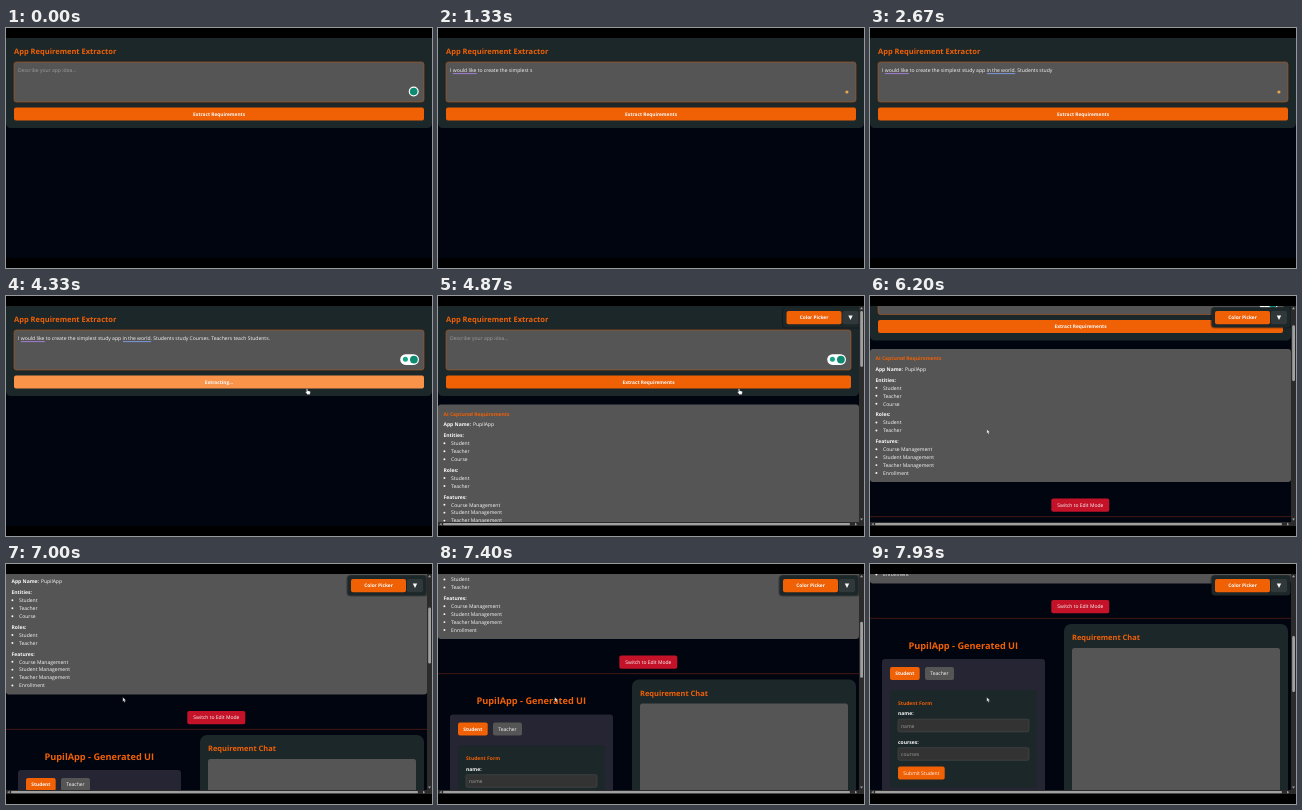
Recreate the animation shown at these times as an HTML page. Size 426 by 240 pixels, loop 8000 ms.

```html
<!DOCTYPE html>
<html lang="en">
<head>
<meta charset="utf-8">
<title>App Requirement Extractor</title>
<style>
  html, body { margin: 0; width: 100%; height: 100%; overflow: hidden; background: #000; }
  svg { display: block; width: 426px; height: 240px; }
  text { font-family: "Open Sans", "Noto Sans", sans-serif; text-rendering: geometricPrecision; white-space: pre; }
</style>
</head>
<body>
<svg id="stage" viewBox="0 0 426 240"></svg>
<script>
const LOOP = 8000, FPS = 15, NOTCH = 55.5;
const ORANGE = '#f06005', CARD = '#1c2729', GREY = '#555', WHITE = '#fafafa', HINT = '#9c9c9c';
const APP = 'PupilApp';
const IDEA = 'I would like to create the simplest study app in the world. ' +
  'Students study Courses. Teachers teach Students.';
const stage = document.getElementById('stage');

const rect = (x, y, w, h, fill, r = 0, extra = '') =>
  `<rect x="${x}" y="${y}" width="${w}" height="${h}" rx="${r}" fill="${fill}" ${extra}/>`;
const circle = (x, y, r, fill) => `<circle cx="${x}" cy="${y}" r="${r}" fill="${fill}"/>`;
const path = (d, fill, extra = '') => `<path d="${d}" fill="${fill}" ${extra}/>`;
const group = (x, y, content) => `<g transform="translate(${x} ${y})">${content}</g>`;

// y is the middle of the lowercase letters' line
const text = (x, y, str, { size = 5.06, fill = WHITE, weight = 400, anchor = 'start' } = {}) =>
  `<text x="${x}" y="${y + size * 0.36}" font-size="${size}" font-weight="${weight}" ` +
  `fill="${fill}" text-anchor="${anchor}">${str}</text>`;
const bold = (x, y, str, opts) => text(x, y, str, { size: 5, weight: 700, ...opts });
const button = (x, y, w, h, fill, label, weight = 400, size = 5) =>
  rect(x, y, w, h, fill, 2) +
  text(x + w / 2, y + h / 2, label, { size, weight, anchor: 'middle' });

const progress = (t, from, to) => Math.min(1, Math.max(0, (t - from) / (to - from)));
const ease = (t, from, to) => {
  const p = progress(t, from, to);
  return p * p * (3 - 2 * p);
};

function assistant(x, t) {
  if (t < 60) return circle(x, 63.5, 5, '#fff') + circle(x, 63.5, 3.8, '#0f8a72');
  if (t < 4000) return circle(x + 1.2, 64, 1.6, '#e5a850');
  return rect(x - 13.5, 58.3, 18.8, 10.6, '#fff', 5.3) +
    circle(x - 8.3, 63.3, 2.5, '#17a488') + circle(x + 0.2, 63.6, 3.9, '#0f8a72');
}

function extractor(t, width, done) {
  const inner = width - 16;
  const typed = done ? '' : IDEA.slice(0, Math.floor(t * 0.02785));
  const busy = t >= 4260 && !done;
  const underline = (x, w, color) => rect(x, 45.2, w, 0.9, color);
  return path(`M0 10H${width}V95q0 5-5 5H5q-5 0-5-5z`, CARD) +
    bold(8, 23.3, 'App Requirement Extractor', { size: 7.5, fill: ORANGE }) +
    rect(8, 34, inner, 40, GREY, 2.5, 'stroke="#b8541a" stroke-width=".6"') +
    (typed ? text(12, 42, typed) : text(12, 42, 'Describe your app idea...', { fill: HINT })) +
    (!done && t > 800 ? underline(14.8, 24, '#a77fe0') : '') +
    (!done && t > 2350 ? underline(117, 28.2, '#7f9fe8') : '') +
    assistant(width - 18.3, t) +
    button(8, 79.5, inner, 13, busy ? '#f9934a' : ORANGE,
      busy ? 'Extracting...' : 'Extract Requirements', 700, 4.8);
}

function list(y, title, items) {
  return bold(5.5, y, title) + items.map((item, i) =>
    circle(6.4, y + 8 + i * 7.95, 0.95, WHITE) + text(13, y + 8 + i * 7.95, item)).join('');
}

function results() {
  return rect(0, 108.5, 421, 133, GREY, 3) +
    bold(5.5, 118, 'AI Captured Requirements', { fill: ORANGE }) +
    bold(5.5, 128.5, 'App Name:') + text(34.9, 128.5, APP) +
    list(139.3, 'Entities:', ['Student', 'Teacher', 'Course']) +
    list(174, 'Roles:', ['Student', 'Teacher']) +
    list(200.7, 'Features:',
      ['Course Management', 'Student Management', 'Teacher Management', 'Enrollment']) +
    button(181.3, 258, 58, 13.3, '#c41228', 'Switch to Edit Mode') +
    rect(0, 275.9, 421, 0.7, '#5a2018');
}

function field(y, name) {
  return bold(28, y, name + ':') +
    rect(28, y + 5.7, 131, 12.6, '#333', 1.5, 'stroke="#505050" stroke-width=".5"') +
    text(31, y + 12.2, name, { fill: HINT });
}

function generated() {
  return bold(93.3, 303.5, APP + ' - Generated UI', { size: 9.2, fill: ORANGE, anchor: 'middle' }) +
    rect(12, 317, 163, 200, '#252533', 3) +
    button(20, 325, 29.7, 13, ORANGE, 'Student', 700, 4.8) +
    button(55, 325, 29, 13, GREY, 'Teacher') +
    rect(20, 348, 147, 97.5, CARD, 2.5) +
    bold(28, 361, 'Student Form', { fill: ORANGE }) +
    field(371.5, 'name') + field(400, 'courses') +
    button(28, 424.5, 46.7, 13, ORANGE, 'Submit Student') +
    rect(194, 282, 224, 240, CARD, 7) +
    bold(202, 295.6, 'Requirement Chat', { size: 7.45, fill: ORANGE }) +
    rect(202, 306, 208, 200, GREY, 2.5);
}

function picker(t) {
  return group(3.5 * (1 - ease(t, 5530, 5670)), 0,
    rect(340.5, 11, 82, 21.5, '#000', 4, 'opacity=".3"') +
    rect(341.5, 11.2, 79, 20.3, CARD, 3.5) +
    button(345, 15, 55, 13.2, ORANGE, 'Color Picker', 700, 4.8) +
    rect(401, 15, 16, 13.2, '#30383a', 2) +
    path('M406.8 19.6h4.4l-2.2 4.4z', WHITE));
}

function scrollbars(scroll) {
  const bar = '#2b2b2b', thumb = '#a0a0a0';
  return rect(421, 10, 5, 220, bar) + rect(0, 226, 426, 4, bar) +
    rect(422.2, 15 + scroll * 0.257, 2.8, 56, thumb, 1.4) +
    rect(5, 227.1, 407, 2.1, thumb, 1) +
    path('M422 13.2h3l-1.5-2.2zM422 222.4h3l-1.5 2.2zM3.6 226.8v2.8l-2.2-1.4zM417 226.8v2.8l2.2-1.4z', thumb);
}

function pointer(t) {
  if (t < 3880) return '';
  const stops = [[3880, 425, 90], [4200, 301, 92.5], [4930, 301, 92.5],
    [5400, 366.5, 18.8], [5530, 366.5, 18.8], [5870, 116.8, 133.3]];
  let [, x, y] = stops[0];
  for (let i = 1; i < stops.length; i++) {
    const p = ease(t, stops[i - 1][0], stops[i][0]);
    x += (stops[i][1] - stops[i - 1][1]) * p;
    y += (stops[i][2] - stops[i - 1][2]) * p;
  }
  const onButton = t < 5000 || (t > 5300 && t < 5600);
  return group(x, y, onButton
    ? path('M-.6.4q.6-.8 1.2 0v1.8l2.2.5q.7.2.6 1L2.9 6H.3L-1.6 3.6q.2-.8 1 0z', '#fff', 'stroke="#222" stroke-width=".3"')
    : path('M0 0v4.4l1-.9.8 1.7.8-.4-.8-1.6h1.4z', '#fff', 'stroke="#111" stroke-width=".3"'));
}

function draw(t) {
  const done = t >= 4860;
  const scroll = NOTCH * (ease(t, 5870, 6200) + (t >= 6999) +
    ease(t, 7000, 7333) + ease(t, 7400, 7733));
  stage.innerHTML = rect(0, 10, 426, 220, '#01050f') +
    group(0, -scroll, extractor(t, done ? 421 : 426, done) + (done ? results() + generated() : '')) +
    (done ? picker(t) + scrollbars(scroll) : '') +
    pointer(t) +
    rect(0, 0, 426, 10, '#000') + rect(0, 230, 426, 10, '#000');
}

let shown = -1;
function tick() {
  const step = Math.floor((performance.now() % LOOP + 5) * FPS / 1000) % (LOOP * FPS / 1000);
  if (step !== shown) draw(step * 1000 / FPS);
  shown = step;
  requestAnimationFrame(tick);
}
tick();
</script>
</body>
</html>
```
